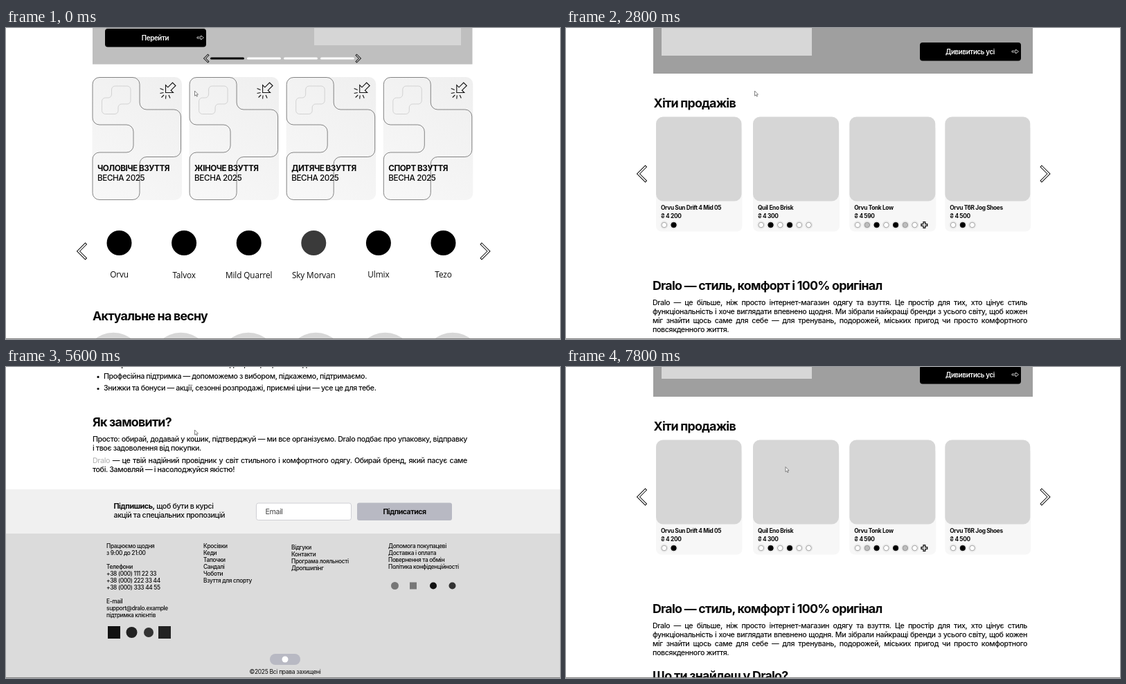
An HTML page with a canvas that plays this animation: 800x450 px, repeating every 8 s.

```html
<!DOCTYPE html>
<html lang="uk">
<head>
<meta charset="utf-8">
<title>Dralo</title>
<style>
html, body { margin: 0; width: 100%; height: 100%; overflow: hidden; background: #fff; }
#stage { position: relative; width: 800px; height: 450px; overflow: hidden; background: #fff; }
#page { position: absolute; left: 0; top: 0; width: 800px; height: 2030px; }
canvas { position: absolute; left: 0; top: 0; }
.t { position: absolute; line-height: 20px; white-space: nowrap; color: #0a0a0a;
  font-family: Inter, "Open Sans", sans-serif; letter-spacing: -.036em; }
.bold { letter-spacing: -.043em; }
.c { transform: translateX(-50%); }
.j { width: 541px; text-align: justify; text-align-last: justify; }
.label { font-family: "Open Sans", Lato, sans-serif; letter-spacing: -.01em; }
#edge { position: absolute; left: 0; top: 449px; width: 800px; height: 1px; background: #828282; }
#mouse { position: absolute; left: 0; top: 0; }
</style>
</head>
<body>
<div id="stage">
  <div id="page"><canvas id="art" width="800" height="2030"></canvas></div>
  <div id="edge"></div>
  <svg id="mouse" width="9" height="12" viewBox="-1 -1 9 12">
    <path d="M0 0V7.2L1.7 5.8 2.9 8.2 4 7.7 2.9 5.2H5Z" fill="#fff" stroke="#666" stroke-width=".8"/>
  </svg>
</div>
<script>
const page = document.getElementById('page');
const mouse = document.getElementById('mouse');
const g = document.getElementById('art').getContext('2d');

// ---------- text helpers: y is the middle of the capitals ----------
function text(x, y, html, size, weight = 500, cls = '', color = '') {
  const el = document.createElement('div');
  el.className = `t ${weight > 600 ? 'bold' : ''} ${cls}`;
  el.innerHTML = html;
  el.style.cssText = `left:${x}px;top:${y - 10}px;font-size:${size}px;font-weight:${weight};` +
    (color ? `color:${color}` : '');
  page.append(el);
}
const BODY = 10.7, SMALL = 8.3;
const heading = (x, y, s) => text(x, y, s, 17.85, 700);
const column = (x, y, lines, step, size) =>
  lines.forEach((s, i) => s && text(x, y + i * step, s, size));
function para(y, lines) {
  lines.forEach((s, i) =>
    text(125, y + i * 12.9, s, BODY, 500, i < lines.length - 1 ? 'j' : ''));
}
function bullets(x, y, lines) {
  column(x, y, lines, 17.1, BODY);
  lines.forEach((_, i) => dot(x - 8, y + i * 17.1 + .5, 1.6, '#0a0a0a'));
}

// ---------- shape helpers ----------
function box(x, y, w, h, r, fill, stroke) {
  g.beginPath();
  g.roundRect(x, y, w, h, r);
  if (fill) { g.fillStyle = fill; g.fill(); }
  if (stroke) { g.strokeStyle = stroke; g.lineWidth = 1; g.stroke(); }
}
function dot(x, y, r, fill, stroke, width = .8) {
  g.beginPath();
  g.arc(x, y, r, 0, 7);
  if (fill) { g.fillStyle = fill; g.fill(); }
  if (stroke) { g.strokeStyle = stroke; g.lineWidth = width; g.stroke(); }
}
function rounded(pts, r, stroke, width) {
  const n = pts.length, [a, b] = [pts[n - 1], pts[0]];
  g.beginPath();
  g.moveTo((a[0] + b[0]) / 2, (a[1] + b[1]) / 2);
  pts.forEach((p, i) => g.arcTo(...p, ...pts[(i + 1) % n], r));
  g.closePath();
  g.strokeStyle = stroke;
  g.lineWidth = width;
  g.stroke();
}
function line(pts, width, color, close) {
  g.beginPath();
  pts.forEach(p => g.lineTo(...p));
  if (close) g.closePath();
  g.lineWidth = width;
  g.strokeStyle = color;
  g.stroke();
}
function chevron(x, y, w, h, dir, outer, inner, fill) {
  const pts = [[x - dir * w, y - h], [x, y], [x - dir * w, y + h]];
  g.lineCap = 'square';
  line(pts, outer, '#111');
  line(pts, inner, fill);
  g.lineCap = 'butt';
}
function plus(x, y, r, width, color) {
  line([[x - r, y], [x + r, y]], width, color);
  line([[x, y - r], [x, y + r]], width, color);
}
function arrow(x, y) {
  line([[x, y - 1], [x + 5.5, y - 1], [x + 5.5, y - 3], [x + 9.5, y], [x + 5.5, y + 3],
    [x + 5.5, y + 1], [x, y + 1]], .8, '#ddd', true);
}
function button(x, y, label) {
  box(x, y, 146, 26.5, 4, '#000');
  text(x + 72.5, y + 13.5, label, 9.75, 600, 'c', '#fff');
  arrow(x + 133, y + 13);
}

// ---------- hero and slider ----------
box(125, -10, 548.5, 62.5, 0, '#bfbfbf');
box(445, -10, 212, 35, 0, '#d6d6d6');
button(143, 1, 'Перейти');
for (let i = 0; i < 4; i++) box(295 + i * 53, 42.5, 49, 3, 1.5, i ? '#fff' : '#000');
chevron(287, 44, 4.5, 4.5, -1, 3, 1.2, '#ccc');
chevron(511, 44, 4.5, 4.5, 1, 3, 1.2, '#ccc');

// ---------- collection tiles ----------
function tile(x, title) {
  g.save();
  g.translate(x, 71);
  const shade = g.createLinearGradient(0, 178, 129, 0);
  shade.addColorStop(0, '#f8f8f8');
  shade.addColorStop(1, '#efefef');
  box(0, 0, 129.5, 178, 10, shade);
  rounded([[.5, .5], [68.5, .5], [68.5, 47], [128, 47], [128, 115.5], [68.5, 115.5],
    [68.5, 177.5], [.5, 177.5], [.5, 109], [59.5, 109], [59.5, 69], [.5, 69]], 10, '#555', .7);
  rounded([[28, 13], [55.5, 13], [55.5, 39], [37.5, 39], [37.5, 53.5], [14, 53.5],
    [14, 30], [28, 30]], 5, '#c4c4c4', .7);
  line([[106, 22.5], [106, 11.5], [109.3, 14.8], [116, 8], [120.5, 12.5], [113.7, 19.2],
    [117, 22.5]], 1.1, '#111', true);
  [[[98, 16.5], [103, 18.5]], [[98, 23.5], [103, 22.5]], [[100, 29.5], [103.5, 26]],
    [[106, 31.5], [106.5, 26.5]], [[112.5, 30.5], [110.5, 26]]]
    .forEach(p => line(p, 1.1, '#111'));
  g.restore();
  text(x + 7.5, 203.2, title, 11.75, 700);
  text(x + 7.5, 217.2, 'ВЕСНА 2025', 11.7);
}
['ЧОЛОВІЧЕ ВЗУТТЯ', 'ЖІНОЧЕ ВЗУТТЯ', 'ДИТЯЧЕ ВЗУТТЯ', 'СПОРТ ВЗУТТЯ']
  .forEach((s, i) => tile(124.5 + i * 140.1, s));

// ---------- brands ----------
['Orvu', 'Talvox', 'Mild Quarrel', 'Sky Morvan', 'Ulmix', 'Tezo'].forEach((s, i) => {
  const x = 163.5 + i * 93.6;
  dot(x, 311, 18, i === 3 ? '#3a3a3a' : '#000');
  text(x, i > 0 && i < 4 ? 357.2 : 355.7, s, 11.8, 400, 'c label');
});
function sideArrows(y) {
  chevron(104.5, y, 10, 10, -1, 3.8, 1.8, '#fff');
  chevron(697, y, 10, 10, 1, 3.8, 1.8, '#fff');
}
sideArrows(323);
sideArrows(946);

// ---------- categories ----------
heading(125, 416.5, 'Актуальне на весну');
[[155, 'Кросівки'], [253, 'Кеди'], [350.5, 'Тапочки'], [449, 'Сандалі'],
  [548.5, 'Взуття на літо'], [648.5, 'Для спорту']].forEach(([x, s], i) => {
  dot([155, 252.5, 350, 447.5, 547.5, 645][i], 483.5, 42.7, '#d7d7d7');
  text(x, 540.5, s, 11.75, 500, 'c');
});

// ---------- banner ----------
box(126, 586, 548, 215, 0, '#9f9f9f');
box(138, 628.5, 217, 146.5, 0, '#d7d7d7');
button(511, 756, 'Дививитись усі');

// ---------- products: w white, b black, g grey, + more ----------
heading(126.5, 843.5, 'Хіти продажів');
function product(x, w, name, price, colors) {
  box(x, 875, w + 1, 154.5, 8, '#f7f7f7');
  box(x, 863.5, w, 122, 10, '#d6d6d6');
  text(x + 7, 995, name, 8.35, 700);
  text(x + 6.7, 1007, '₴ ' + price, 8.35, 700);
  [...colors].forEach((c, i) => {
    const cx = x + 11.8 + i * 13.75, cy = 1020;
    if (c === '+') {
      plus(cx, cy, 5, 4, '#111');
      plus(cx, cy, 3.7, 1.4, '#fff');
      return;
    }
    dot(cx, cy, 5.2, '#fff', '#d0d0d0', .6);
    dot(cx, cy, 3.8, { w: '#fff', b: '#000', g: '#bdbdbd' }[c], c === 'b' ? '#000' : '#777', .7);
  });
}
product(130, 123.5, 'Orvu Sun Drift 4 Mid 05', '4 200', 'wb');
product(270, 124, 'Quil Eno Brisk', '4 300', 'wbwbww');
product(409.3, 124, 'Orvu Tonk Low', '4 590', 'wgbwbgw+');
product(547.3, 123, 'Orvu T6R Jog Shoes', '4 500', 'wbw');

// ---------- about ----------
heading(125, 1108, 'Dralo — стиль, комфорт і 100% оригінал');
para(1133.3, [
  'Dralo — це більше, ніж просто інтернет-магазин одягу та взуття. Це простір для тих, хто цінує стиль',
  'функціональність і хоче виглядати впевнено щодня. Ми зібрали найкращі бренди з усього світу, щоб кожен',
  'міг знайти щось саме для себе — для тренувань, подорожей, міських пригод чи просто комфортного',
  'повсякденного життя.']);
heading(125, 1205.2, 'Що ти знайдеш у Dralo?');
para(1231, [
  'У нашому каталозі — лише оригінальна продукція від легендарних брендів: Orvu, Talvox, Tezo, Dorvak',
  'Ulmix, Mild Quarrel, Quil, Perlonde та ще багато інших. Ми постійно оновлюємо асортимент — додаємо',
  'новинки, лімітовані колекції, колаборації та хіти попередніх сезонів.']);
text(126, 1275, 'Одяг, взуття та аксесуари для чоловіків, жінок і дітей:', BODY);
bullets(142, 1296, ['Кросівки', 'Кеди', 'Черевики', 'Чоботи', 'І багато іншого']);
text(125, 1383.3, 'Все — тільки від перевірених брендів, з офіційних постачань.', BODY);
heading(125, 1420, 'Бренди, з якими ми працюємо');
para(1445.3, [
  'У Dralo ти знайдеш не тільки гігантів, як Orvu чи Talvox, але й ексклюзив — бренди, які рідко зустрічаються в',
  "Україні: EHH, IVRO, QZN, Nul'boran, Vastrel, Glorent, а також люксові позиції від Luvvi, Marwin Stolt, Plonx,",
  'Torrevandia, та ін.']);
heading(125, 1518, 'Чому обирають Dralo?');
bullets(141, 1542.6, [
  '100% оригінал — ніяких копій, тільки справжній бренд.',
  'Швидка доставка — відправляємо замовлення по всій Україні.',
  'Повернення без зайвих питань — 14 днів, якщо щось не підійшло.',
  'Професійна підтримка — допоможемо з вибором, підкажемо, підтримаємо.',
  'Знижки та бонуси — акції, сезонні розпродажі, приємні ціни — усе це для тебе.']);
heading(125, 1660, 'Як замовити?');
para(1685, [
  'Просто: обирай, додавай у кошик, підтверджуй — ми все організуємо. Dralo подбає про упаковку, відправку',
  'і твоє задоволення від покупки.']);
para(1716, [
  '<span style="color:#b8b8b8">Dralo</span> — це твій надійний провідник у світ стильного і комфортного одягу. Обирай бренд, який пасує саме',
  'тобі. Замовляй — і насолоджуйся якістю!']);

// ---------- newsletter ----------
box(0, 1757, 800, 64, 0, '#f0f0f0');
text(155.5, 1782, '<b>Підпишись,</b> щоб бути в курсі', BODY);
text(155.5, 1795, 'акцій та спеціальних пропозицій', BODY);
box(361.5, 1777, 137, 24.5, 3, '#fff', '#cfcfd4');
text(374.5, 1790, 'Email', BODY, 400, '', '#444');
box(507, 1776.5, 137, 25.5, 3, '#b8b9c3');
text(575.5, 1789.5, 'Підписатися', 10.5, 700, 'c');

// ---------- footer ----------
box(0, 1821, 800, 209, 0, '#dbdbdb');
column(145, 1838.5, ['Працюємо щодня', 'з 9:00 до 21:00', '', 'Телефони', '+38 (000) 111 22 33',
  '+38 (000) 222 33 44', '+38 (000) 333 44 55', '', 'E-mail', 'support@dralo.example',
  'підтримка клієнтів'], 10, SMALL);
column(285, 1838.5, ['Кросівки', 'Кеди', 'Тапочки', 'Сандалі', 'Чоботи', 'Взуття для спорту'], 10, SMALL);
column(412, 1840.5, ['Відгуки', 'Контакти', 'Програма лояльності', 'Дропшипінг'], 10, SMALL);
column(552, 1838.5, ['Допомога покупацеві', 'Доставка і оплата', 'Повернення та обмін',
  'Політика конфіденційності'], 10, SMALL);
dot(561.5, 1896.5, 5.5, '#777');
box(583, 1891.5, 10, 10, 0, '#777');
dot(617, 1896.5, 5, '#111');
dot(644.5, 1896.5, 5, '#333');
box(147, 1955, 18, 18, 0, '#111');
dot(181.5, 1964, 8, '#222');
dot(206, 1964, 7, '#333');
box(220, 1955, 18, 18, 0, '#222');
box(381, 1995, 44, 16, 8, '#b8b9c3');
dot(403, 2003, 4.5, '#fff');
text(403, 2020.5, '©2025 Всі права захищені', 8.5, 400, 'c');

// ---------- motion: the screen refreshes five times a second ----------
const LOOP = 8000, TICK = 200;
const scroll = [[1200, 0], [1400, 45], [2200, 435], [2800, 735], [3000, 770], [3200, 770],
  [3600, 1023], [3800, 1055], [4400, 899], [4600, 980], [5400, 1545], [5600, 1580],
  [6200, 1099], [6800, 850], [7400, 770], [7800, 758]];
const mouseX = [[6800, 272.5], [7600, 317]];
const mouseY = [[6800, 91], [7600, 144.5]];

function at(keys, t) {
  const i = keys.findIndex(k => k[0] > t);
  if (i === 0) return keys[0][1];
  if (i < 0) return keys[keys.length - 1][1];
  const [t0, a] = keys[i - 1], [t1, b] = keys[i];
  return a + (b - a) * (t - t0) / (t1 - t0);
}
const start = performance.now();
function frame() {
  const t = Math.floor((performance.now() - start) % LOOP / TICK) * TICK;
  page.style.transform = `translateY(${-Math.round(at(scroll, t))}px)`;
  mouse.style.transform = `translate(${at(mouseX, t) - 1}px,${at(mouseY, t) - 1}px)`;
  requestAnimationFrame(frame);
}
frame();
</script>
</body>
</html>
```
